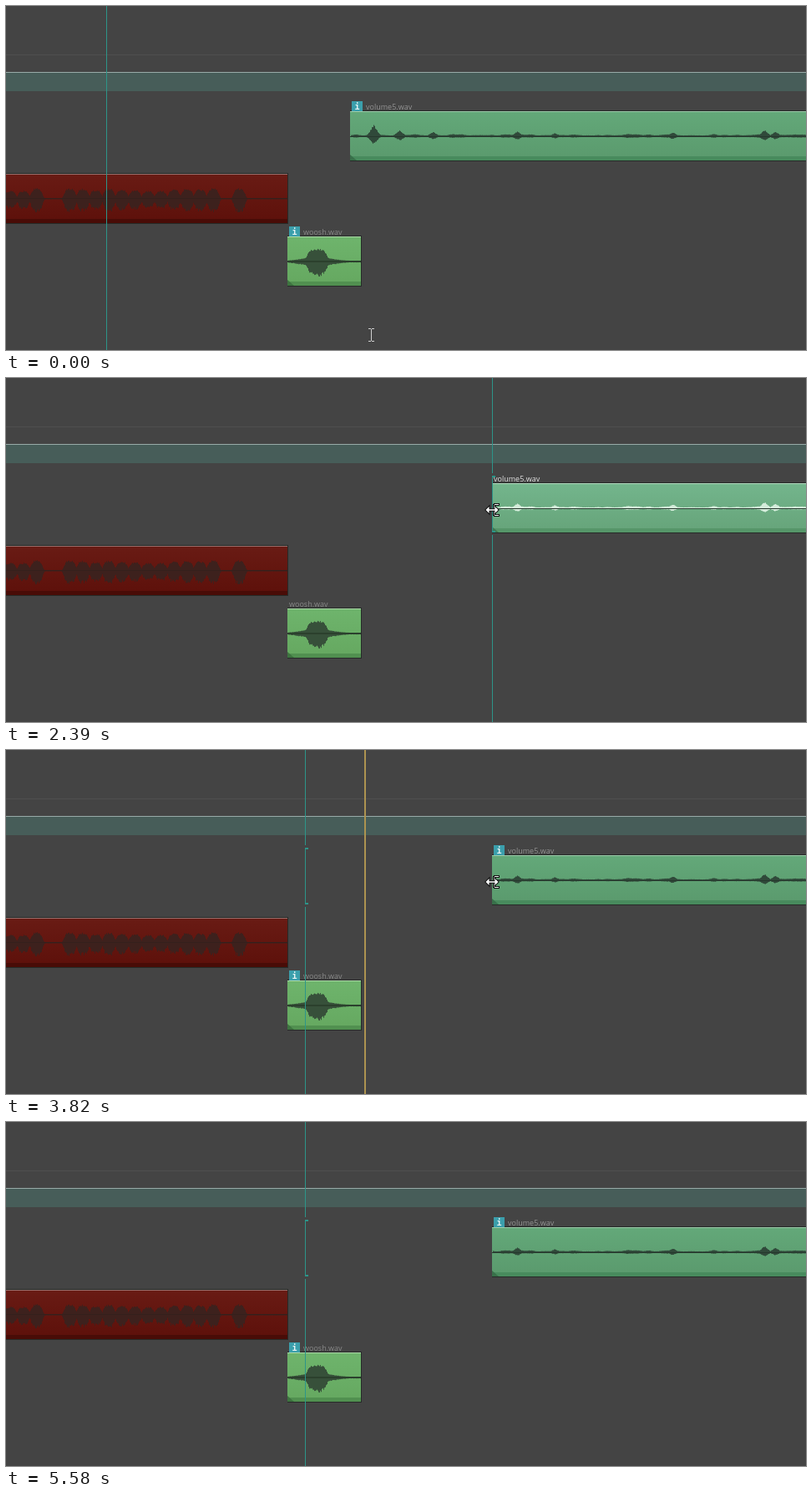
Recreate the animation shown at these times as an HTML page with a canvas. Size 958 px wide and 412 px high, loop 6.3 s.

```html
<!DOCTYPE html>
<html lang="en">
<head>
<meta charset="utf-8">
<title>Audio timeline</title>
<style>
  html, body { margin: 0; width: 100%; height: 100%; overflow: hidden; background: #444; }
  canvas { display: block; }
</style>
</head>
<body>
<canvas id="stage" width="958" height="412"></canvas>
<script>
const W = 958, H = 412, LOOP = 6300;
const ctx = document.getElementById('stage').getContext('2d');

const noise = i => {
  const v = Math.sin(i * 127.1 + 3.7) * 43758.5453;
  return v - Math.floor(v);
};

// Noise eased between cells
function hum(x, cell) {
  const i = Math.floor(x / cell), f = x / cell - i;
  const k = f * f * (3 - 2 * f);
  return noise(i) * (1 - k) + noise(i + 1) * k;
}

const bump = (x, centre, width, power) => Math.exp(-Math.pow(Math.abs(x - centre) / width, power));

// Loudness at x for each sound
function musicLevel(x) {
  const peaks = [[440, 13], [471, 7], [511, 5], [612, 5.5], [657, 3.5], [798, 4.5], [908, 7], [921, 5]];
  const murmur = 1 + 2.2 * hum(x, 7) * hum(x + 90, 11);
  return Math.max(murmur, ...peaks.map(([c, a]) => a * bump(x, c, 5.5, 1.6)));
}

function voiceLevel(x) {
  const phrases = [[5, 3], [76, 12], [279, 1]];
  let level = 0.5;
  for (const [first, count] of phrases)
    for (let i = 0; i < count; i++) {
      const c = first + i * 15.6;
      level = Math.max(level, (9 + 3.5 * noise(c)) * bump(x, c, 7.5, 4));
    }
  return level;
}

function wooshLevel(x) {
  const body = 15 * bump(x, 372, 13, 4);
  const tail = 10 * Math.exp(-Math.abs(x - 372) / 17);
  return Math.max(1, body, tail);
}

function rect(x, y, w, h, fill) {
  ctx.fillStyle = fill;
  ctx.fillRect(x, y, w, h);
}

function poly(points, fill, stroke) {
  ctx.beginPath();
  points.forEach(([x, y]) => ctx.lineTo(x, y));
  ctx.closePath();
  if (stroke) {
    ctx.strokeStyle = stroke;
    ctx.lineWidth = 2;
    ctx.stroke();
  }
  ctx.fillStyle = fill;
  ctx.fill();
}

function wave(level, x0, x1, mid, lower, color) {
  ctx.fillStyle = color;
  for (let x = x0; x < x1; x++) {
    const up = level(x) * (1.05 - 0.2 * noise(x));
    const down = level(x) * lower * (1.1 - 0.3 * noise(x + 500));
    ctx.fillRect(x, mid - up, 1, up + down);
  }
}

function clip(x, right, y, c) {
  const w = right - x - 1;
  rect(x, y, w + 1, 61, '#262b28');
  const g = ctx.createLinearGradient(0, y + 2, 0, y + 55);
  g.addColorStop(0, c.top);
  g.addColorStop(1, c.low);
  rect(x, y + 1, w, 59, g);
  rect(x, y + 1, w, 1, c.edge);
  rect(x, y + 55, w, 5, c.foot);
  if (c.corner) poly([[x, y + 53], [x + 8, y + 60], [x, y + 60]], c.corner);
}

function label(text, x, y, badge, color) {
  if (badge) {
    rect(x, y - 10, 13, 12, '#3b9fac');
    ctx.font = 'bold 10px "DejaVu Sans Mono", monospace';
    ctx.textAlign = 'center';
    ctx.fillStyle = '#e8f4f5';
    ctx.fillText('i', x + 6.5, y);
  }
  ctx.font = '9px "Open Sans", sans-serif';
  ctx.textAlign = 'left';
  ctx.fillStyle = color;
  ctx.fillText(text, x + (badge ? 17 : 0), y);
}

const GREEN = { top: '#63a879', low: '#5b9b6e', edge: '#9ccbaa', foot: '#488b5d', corner: '#38704a' };
const PICKED = { top: '#73b58c', low: '#67a57b', edge: '#b2dabf', foot: '#569669', corner: '#3f7852' };
const LEAF = { top: '#6eb46c', low: '#66a961', edge: '#acd8a8', foot: '#519050', corner: '#3e7440' };
const RED = { top: '#691b14', low: '#5e110b', edge: '#98716e', foot: '#490c07' };

// Double arrow along x, made from one mirrored half
function doubleArrow(reach, head, stem) {
  const half = [[-reach, 0], [head - reach, -head], [head - reach, -stem]];
  const flip = (sx, sy) => half.map(([x, y]) => [x * sx, y * sy]);
  poly([...flip(1, 1), ...flip(-1, 1).reverse(), ...flip(-1, -1), ...flip(1, -1).reverse()], '#fff', '#111');
}

// Pointer shapes around their own origin
const shapes = {
  beam() {
    const c = '#d0d0d0';
    rect(0, -7, 1, 14, c);
    for (const y of [-8, 7])
      for (const x of [-3, 1]) rect(x, y, 3, 1, c);
  },
  arrow() {
    poly([[0, 1], [0, 15.5], [3.3, 12.4], [5.8, 18], [8.2, 17], [5.8, 11.5], [10.5, 11.5]], '#fff', '#111');
  },
  updown() {
    ctx.translate(0.5, 0.5);
    ctx.rotate(Math.PI / 2);
    doubleArrow(10.5, 4, 0.8);
  },
  trim() {
    for (const [color, grow] of [['#111', 1], ['#fff', 0]]) {
      rect(2 - grow, -6 - grow, 1 + 2 * grow, 12 + 2 * grow, color);
      for (const y of [-7, 6]) rect(3 - grow, y - grow, 5 + 2 * grow, 1 + 2 * grow, color);
    }
    doubleArrow(7.5, 4, 0.8);
  }
};

// Pointer steps: time, shape, x, y
const POINTER = [
  [0, 'beam', 437, 394], [430, 'beam', 456, 368], [550, 'beam', 520, 304],
  [700, 'beam', 576, 240], [820, 'beam', 579, 208], [940, 'arrow', 579, 180],
  [1090, 'arrow', 583, 165], [1220, 'updown', 582, 158], [2390, 'trim', 582, 158],
  [5310, 'beam', 603, 304], [5430, 'beam', 727, 388], [5580]
];
// Edit steps: time, marker x, clip start, clip selected
const EDIT = [[0, 120, 412, false], [1520, 582, 412, true], [2390, 582, 582, true], [2510, 358, 582, false]];
const PLAY = { from: 2630, to: 5010, tick: 131, x: 363.7, step: 7.31 };

const at = (steps, t) => steps.filter(s => s[0] <= t).pop();

function marker(x, split) {
  const c = '#2d9589';
  if (!split) return rect(x, 0, 1, H, c);
  rect(x, 0, 1, 114, c);
  rect(x, 117, 1, 68, c);
  rect(x, 188, 1, H - 188, c);
  for (const y of [117, 183]) rect(x, y, 4, 2, c);
}

function playhead(t) {
  if (t < PLAY.from || t >= PLAY.to) return;
  const n = Math.floor((t - PLAY.from) / PLAY.tick);
  rect(Math.floor(PLAY.x + n * PLAY.step), 0, 2, H, '#ad9350');
}

function draw(t) {
  const [, mark, start, picked] = at(EDIT, t);
  rect(0, 0, W, H, '#444');
  rect(0, 58, W, 1, '#4f4f4f');
  rect(0, 79, W, 1, '#98aaa7');
  rect(0, 80, W, 22, '#475d59');

  clip(start, W + 4, 125, picked ? PICKED : GREEN);
  wave(musicLevel, start + 1, W, 156, 0.7, picked ? '#d5ecdb' : '#30493a');
  rect(start, 156, W - start, 1, '#26382d');
  label('volume5.wav', start + 2, 124, !picked, picked ? '#e2e2e2' : '#939393');

  clip(-2, 338, 200, RED);
  wave(voiceLevel, 0, 337, 231, 1.2, '#3d211d');
  rect(0, 230, 337, 1, '#35201c');

  clip(337, 426, 275, LEAF);
  wave(wooshLevel, 338, 425, 306, 1.1, '#37503a');
  rect(337, 305, 88, 2, '#2b402d');
  label('woosh.wav', 339, 274, !picked, '#898989');

  marker(mark, t >= EDIT[1][0]);
  playhead(t);

  const [, shape, x, y] = at(POINTER, t);
  if (shape) {
    ctx.save();
    ctx.translate(x, y);
    shapes[shape]();
    ctx.restore();
  }
}

const begin = performance.now();
function frame() {
  draw((performance.now() - begin) % LOOP);
  requestAnimationFrame(frame);
}
frame();
</script>
</body>
</html>
```
